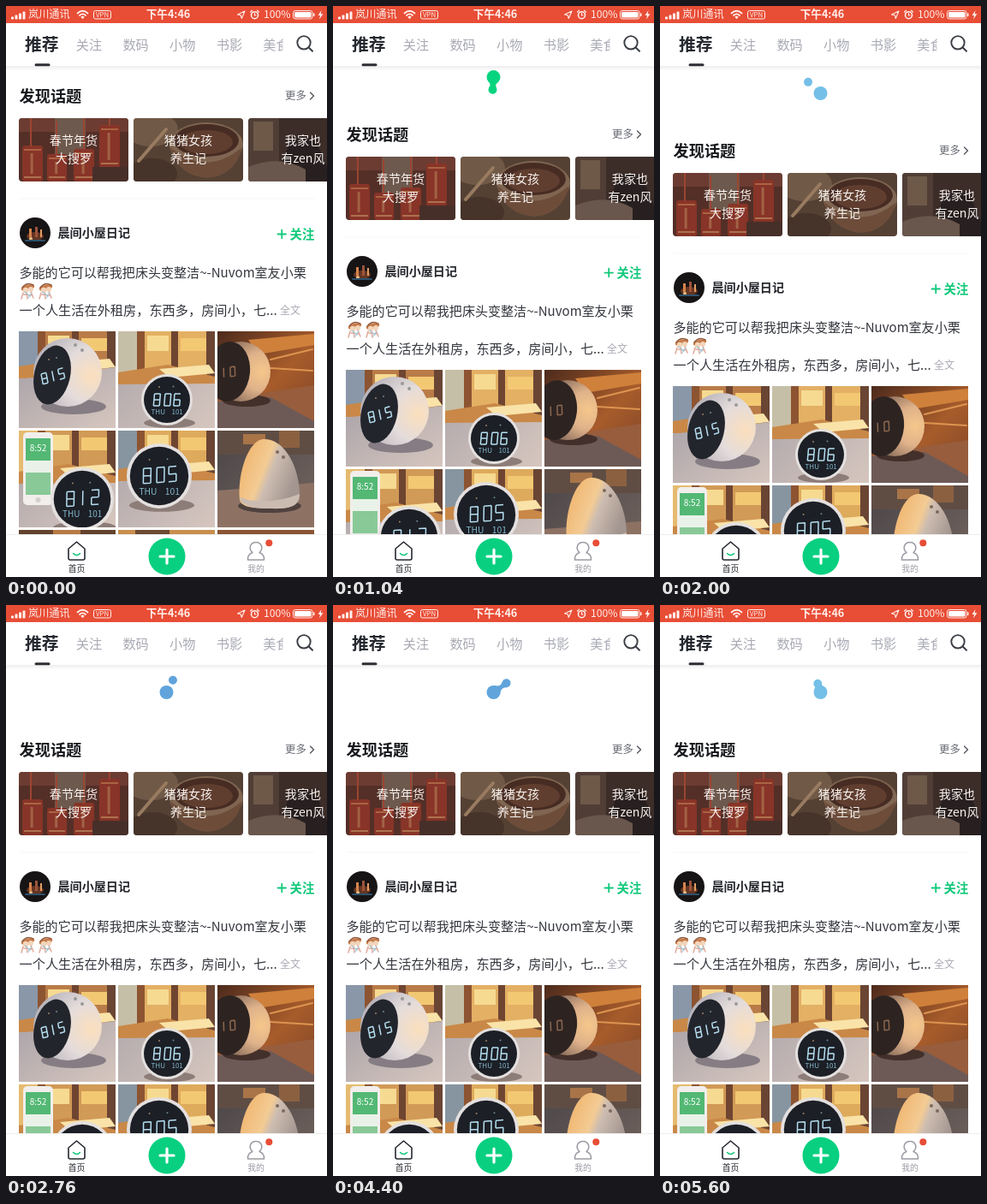
An HTML page for the animation above (5640 ms loop, 375 px wide and 667 px high).

```html
<!DOCTYPE html>
<html lang="zh-CN">
<head>
<meta charset="utf-8">
<title>Pull to refresh</title>
<style>
html,body{margin:0;width:100%;height:100%;overflow:hidden;background:#fff}
svg{display:block}
#stage{width:100vw;height:100vh}
text{font-family:"Noto Sans CJK SC","Noto Sans CJK",sans-serif}
</style>
</head>
<body>
<svg id="stage" viewBox="0 0 375 667">
<defs>
<linearGradient id="shade" x2="0" y2="1"><stop stop-color="#000" stop-opacity=".07"/><stop offset="1" stop-color="#000" stop-opacity="0"/></linearGradient>
<linearGradient id="table" x2="1" y2="1"><stop stop-color="#aaa3a9"/><stop offset="1" stop-color="#d6c6be"/></linearGradient>
<linearGradient id="wood" x2="1" y2="1"><stop stop-color="#4c2a1c"/><stop offset=".55" stop-color="#a85c2b"/><stop offset="1" stop-color="#7a4227"/></linearGradient>
<linearGradient id="dusk" x2="1" y2="1"><stop stop-color="#4a4548"/><stop offset="1" stop-color="#75665f"/></linearGradient>
<linearGradient id="dome" x2="1" y2=".45"><stop stop-color="#efae62"/><stop offset=".5" stop-color="#f3cb94"/><stop offset=".62" stop-color="#cdbdb1"/><stop offset="1" stop-color="#a3958f"/></linearGradient>
<radialGradient id="ball" cx=".85" cy=".55" r=".8"><stop stop-color="#fbdfbd"/><stop offset=".5" stop-color="#e4dcdb"/><stop offset="1" stop-color="#b9b5bd"/></radialGradient>
<radialGradient id="warm" cx=".85" cy=".5" r=".8"><stop stop-color="#f6c78b"/><stop offset=".4" stop-color="#dfb28a"/><stop offset="1" stop-color="#6d564c"/></radialGradient>
<clipPath id="card"><rect width="128" height="74" rx="4"/></clipPath>
<clipPath id="photo"><rect width="113" height="113"/></clipPath>
<clipPath id="tabs"><rect x="295" y="30" width="28.5" height="32"/></clipPath>
</defs>
<g id="list"></g>
<g id="blob"><circle r="8"/><g id="arm"><path id="neck"/><circle id="small" r="5"/></g></g>
<g id="chrome"></g>
</svg>
<script>
const $ = id => document.getElementById(id);
const DARK = '#25282f', GREY = '#a8a9b3', GREEN = '#08d080', RED = '#e84d36';

const rect = (x, y, w, h, fill, more = '') => `<rect x="${x}" y="${y}" width="${w}" height="${h}" fill="${fill}" ${more}/>`;
const disc = (x, y, r, fill, more = '') => `<circle cx="${x}" cy="${y}" r="${r}" fill="${fill}" ${more}/>`;
const oval = (x, y, rx, ry, fill, turn = 0) => `<ellipse cx="${x}" cy="${y}" rx="${rx}" ry="${ry}" fill="${fill}" transform="rotate(${turn} ${x} ${y})"/>`;
const shape = (d, fill) => `<path d="${d}" fill="${fill}"/>`;
const line = (d, color, w = 1) => `<path d="${d}" fill="none" stroke="${color}" stroke-width="${w}" stroke-linecap="round" stroke-linejoin="round"/>`;
const text = (s, x, y, size, fill, more = '') => `<text x="${x}" y="${y}" font-size="${size}" fill="${fill}" ${more}>${s}</text>`;
const group = (x, y, body, more = '') => `<g transform="translate(${x} ${y})"><g ${more}>${body}</g></g>`;
const MID = 'text-anchor="middle"', BOLD = 'font-weight="700"';

// Seven-segment digits
const SEG = { a: 'M0 0H1', b: 'M1 0V1', c: 'M1 1V2', d: 'M0 2H1', e: 'M0 1V2', f: 'M0 0V1', g: 'M0 1H1', i: 'M.4 0V2' };
const LIT = { 0: 'abcdef', 1: 'i', 2: 'abged', 5: 'afgcd', 6: 'afgcde', 8: 'abcdefg' };
function digits(s, x, y, w, turn = 0, color = '#b5dff0') {
  const glyphs = [...s].map((c, i) =>
    `<path transform="translate(${i * 1.6 + (i ? .2 : 0)} 0)" d="${[...LIT[c]].map(k => SEG[k]).join('')}"/>`).join('');
  return `<g transform="translate(${x} ${y}) rotate(${turn}) skewX(-5) scale(${w})" fill="none" stroke="${color}" stroke-width="${1.5 / w}">${glyphs}</g>`;
}

function clock(x, y, r, time, turn = 0) {
  const w = r * .23;
  return oval(x + 3, y + r * .9, r, r * .2, '#8d7d78') + disc(x, y, r, '#e4e0df') + disc(x, y, r * .9, '#1c1f26')
    + digits(time, x - w * 2.1, y - w, w, turn)
    + text('THU', x - r * .62, y + r * .58, r * .27, '#83b8cc') + text('101', x + r * .18, y + r * .58, r * .27, '#83b8cc')
    + disc(x - r * .3, y - r * .5, 1, '#9c8064') + disc(x + r * .25, y - r * .52, 1, '#6e8793');
}

const street = (y, wall, sky) => rect(0, 0, 113, 113, 'url(#table)') + rect(0, 0, 113, y, wall)
  + rect(0, 0, 22, y - 8, sky) + rect(22, 0, 9, y, '#8d5432') + rect(34, 5, 25, 18, '#f6da91')
  + rect(62, 0, 8, y - 12, '#6f4531') + rect(73, 8, 30, 15, '#f3c873') + rect(103, 0, 10, y, '#6a4533')
  + shape(`M0 ${y - 9}L58 ${y - 18}L113 ${y - 4}V${y + 4}L0 ${y + 5}Z`, '#c98847')
  + shape(`M48 ${y - 13}L106 ${y - 18}L113 ${y - 8}L60 ${y - 3}Z`, '#f9e3a8');

const photos = [
  street(50, '#b97c48', '#8997a8') + shape('M0 56L113 42V113H0Z', 'url(#table)')
    + oval(64, 88, 38, 9, '#857d83') + disc(57, 48, 40, 'url(#ball)')
    + oval(39, 51, 21, 35, '#23252c', 13) + digits('815', 26, 50, 6, -16)
    + disc(66, 16, 2, '#999') + disc(74, 22, 2, '#999') + disc(35, 33, 1, '#9c8064') + disc(44, 31, 1, '#6e8793'),
  street(57, '#e3b064', '#c6bfa7') + clock(57, 80, 30, '806'),
  rect(0, 0, 113, 113, 'url(#wood)') + shape('M36 10L113 3V16L48 27Z', '#cf803b') + shape('M0 80L113 63V113H0Z', '#985d3c')
    + shape('M0 82L62 77L113 105V113H0Z', '#6d5a56') + line('M62 33L111 21M62 43L111 46', '#dd9450', 2)
    + oval(34, 81, 28, 7, '#43302a') + disc(27, 47, 35, 'url(#warm)') + oval(13, 47, 25, 35, '#2d2422', 6)
    + digits('10', 5, 43, 5.5, -7, '#8d674e'),
  street(57, '#d19a56', '#e5bb70') + rect(5, 2, 35, 85, '#f1eeec', 'rx="5"') + rect(8, 9, 29, 66, '#53b874')
    + rect(8, 35, 29, 14, '#e9f2e9') + rect(8, 49, 29, 26, '#88c997') + text('8:52', 22.5, 24, 10, '#fff', MID)
    + disc(22.5, 81, 3, '#d4d0d0') + clock(74, 80, 37, '812', -4),
  street(54, '#deaa5c', '#8795a0') + clock(48, 53, 38, '805', -4),
  rect(0, 0, 113, 113, 'url(#dusk)') + rect(0, 0, 113, 28, '#5f4d44') + rect(30, 4, 26, 12, '#a87448') + rect(72, 0, 24, 20, '#8b6041')
    + shape('M0 70L113 61V113H0Z', '#8d7264') + oval(61, 88, 37, 8, '#4f423e')
    + shape('M26 81C23 55 34 13 53 10C77 8 96 41 96 76C95 89 83 91 62 91C40 91 28 89 26 81Z', 'url(#dome)')
    + shape('M26 78Q57 89 96 74C96 88 86 92 61 91Q27 91 26 78Z', '#cbbcb2') + disc(70, 25, 2, '#7d6a60') + disc(77, 31, 2, '#7d6a60'),
  rect(0, 0, 113, 113, '#64432e') + rect(40, 0, 32, 20, '#b77a45'),
  rect(0, 0, 113, 113, '#c98f4d') + rect(20, 0, 40, 20, '#6e4a33'),
  rect(0, 0, 113, 113, '#8b5534')
];

const lantern = (x, y, w, h) => rect(x, y, w, h, '#93382b', 'rx="3"') + rect(x + 2, y + 4, w - 4, 2, '#b96b48')
  + rect(x + 2, y + h - 6, w - 4, 2, '#bd7b55') + rect(x + w * .4, y + 9, 3, h - 18, '#b06a4b');
const scenes = [
  rect(0, 0, 128, 74, '#5a332a') + rect(0, 0, 128, 16, '#754136') + rect(42, 0, 36, 44, '#766153')
    + lantern(4, 32, 24, 42) + lantern(33, 42, 23, 32) + lantern(64, 36, 24, 38) + lantern(94, 8, 24, 50)
    + line('M14 0V32M106 0V8M76 0V36M44 4V42', '#a94a35', 2) + rect(86, 57, 42, 17, '#4d332d'),
  rect(0, 0, 128, 74, '#5b4638') + oval(20, 13, 32, 20, '#79604c') + oval(85, 31, 43, 26, '#8b6f59')
    + oval(85, 26, 38, 19, '#4d3026') + oval(85, 28, 31, 14, '#684333') + shape('M43 34Q85 69 127 34Q119 67 86 70Q51 67 43 34Z', '#76543f')
    + oval(22, 65, 29, 18, '#4c372d') + line('M6 50L38 13', '#a58568', 4),
  rect(0, 0, 128, 74, '#41312d') + rect(0, 0, 36, 74, '#57433b') + shape('M30 74L48 30Q65 10 82 33L99 74Z', '#2b2323')
    + shape('M0 57Q36 42 67 60V74H0Z', '#725d52') + rect(6, 4, 23, 34, '#77604f')
];
const captions = [['春节年货', '大搜罗'], ['猪猪女孩', '养生记'], ['我家也', '有zen风']];

const dancer = x => group(x, 323,
  oval(9.5, 6, 8, 3.4, '#c87a48', -14) + line('M3 6Q8 -1 16 3', '#8b563c', 1.4) + disc(7, 9, 3.2, '#f2d5bb') + disc(13, 8, 3, '#f2d5bb')
  + line('M4 12L2 19M8 12L9 19M13 11L16 18M5 14L15 15', '#e2a99a', 1.5) + line('M6 11L12 16M14 12L10 18', '#9fc9d8', 1.2));

$('list').innerHTML = [
  text('发现话题', 15.5, 111.5, 18.2, '#17191d', BOLD),
  text('更多', 326, 109.2, 12.4, '#666972'), line('M355.5 101L359.5 105L355.5 109', '#55585f', 1.4),
  scenes.map((s, i) => group(15 + 134 * i, 131,
    s + rect(0, 0, 128, 74, '#000', 'opacity=".08"')
    + captions[i].map((c, j) => text(c, 64, 31 + 21 * j, 14.1, '#f7f2ef', MID)).join(''), 'clip-path="url(#card)"')).join(''),
  rect(15, 224.5, 345, 1, '#f8f7f7'),
  disc(34, 265, 18, '#171415'), oval(34, 269, 10, 5, '#653623'), rect(27, 260, 3, 10, '#d6844c'), rect(34, 258, 3, 12, '#9c543b'),
  rect(40, 261, 2, 9, '#e39d61'), disc(29, 272, 2, '#ecbd82'), line('M23 274H45', '#2d516d', 2),
  text('晨间小屋日记', 60.5, 270, 14.1, '#24262c', BOLD),
  line('M317.5 266.5H327M322.25 261.7V271.3', '#10c97a', 1.8), text('关注', 331.5, 271.5, 14.4, '#10c97a', BOLD),
  text('多能的它可以帮我把床头变整洁~-Nuvom室友小栗', 15.5, 316.5, 15.05, '#33363d'),
  dancer(16), dancer(37),
  text('一个人生活在外租房，东西多，房间小，七...', 15.5, 360.5, 15.2, '#33363d'), text('全文', 320, 359.8, 12, GREY),
  photos.map((p, i) => group(15 + 116 * (i % 3), 380 + 116 * Math.floor(i / 3), p, 'clip-path="url(#photo)"')).join('')
].join('');

const PALE = '#fff0ec';
$('chrome').innerHTML = [
  rect(0, 70, 375, 6, 'url(#shade)'), rect(0, 20, 375, 50, '#fff'), rect(0, 0, 375, 20, RED),
  [0, 1, 2, 3].map(i => rect(6 + 4.5 * i, 12.5 - 2 * i, 3, 3 + 2 * i, PALE, 'rx=".6"')).join(''),
  text('岚川通讯', 26, 14.3, 12.2, PALE),
  line('M83.5 8.5Q89.5 3 95.5 8.5M86 11Q89.5 7.8 93 11', PALE, 1.8), shape('M87.3 12.7Q89.5 11 91.7 12.7L89.5 15.2Z', PALE),
  rect(102.5, 5.5, 20, 9.5, 'none', `rx="2" stroke="${PALE}"`), text('VPN', 112.5, 13.1, 7.8, PALE, MID),
  text('下午4:46', 189.5, 14.3, 12.6, PALE, MID + ' ' + BOLD),
  line('M270.5 10L279 6L275.3 14.5L274.3 10.8Z', PALE, 1.1),
  disc(290.5, 10.7, 4, 'none', `stroke="${PALE}" stroke-width="1.6"`), line('M290.5 8.5V11H292M285.5 7L287.5 5.2M295.5 7L293.5 5.2', PALE, 1.2),
  text('100%', 301, 14.4, 12.2, PALE),
  rect(335.5, 5.5, 22.5, 9.5, 'none', `rx="2.4" stroke="${PALE}"`), rect(337, 7, 19.5, 6.5, '#fff', 'rx="1.2"'), rect(359, 8.3, 1.5, 4, PALE, 'rx=".7"'),
  shape('M368.5 5L364.5 11H367L366 15.5L370.5 9.2H367.7Z', PALE),
  text('推荐', 22, 52.2, 19.8, DARK, BOLD),
  ['关注', '数码', '小物', '书影'].map((s, i) => text(s, 81.7 + 54.7 * i, 51, 15.2, GREY)).join(''),
  text('美食', 300.3, 51, 15.2, GREY, 'clip-path="url(#tabs)"'),
  rect(33.5, 67.3, 18, 3, '#2c2e34', 'rx="1.5"'),
  disc(348, 42.8, 7.7, 'none', 'stroke="#3a3d44" stroke-width="1.9"'), line('M353.7 48.5L358 52.7', '#3a3d44', 2),
  rect(0, 617.5, 375, 49.5, '#fff'), rect(0, 617, 375, 1, '#eeeeef'),
  line('M73 634L82.5 626L92 634V645Q92 647 90 647H75Q73 647 73 645Z', DARK, 1.6), line('M78.5 639.5Q82.5 643.5 86.5 639.5', '#10c97a', 1.6),
  text('首页', 82.5, 661, 9.8, DARK, MID),
  disc(188, 643, 21.5, GREEN), line('M180 643H196M188 635V651', '#fff', 3.2),
  line('M288 638.5C283 634 285 626.5 292 626.5S301 634 296 638.5C300 640 302 643 301.5 647H282.5C282 643 284 640 288 638.5Z', '#9a9ca3', 1.5),
  disc(307.3, 627.3, 4, RED), text('我的', 292, 661, 9.8, '#9a9ca3', MID)
].join('');

const LOOP = 5640, STEP = 40, REST = 64, REACH = 21;
const PULL_AT = 780, PULL_FOR = 780, SPIN_AT = 886, CYCLE = 2000;
// Three petals: start angle, swing, colour
const PETALS = [
  [98, -18, [8, 212, 127]],
  [256, -50, [116, 191, 232]],
  [338, -50, [97, 164, 220]]
];
const clamp = v => Math.max(0, Math.min(1, v));

function draw(t) {
  const pulled = 1 - Math.pow(1 - clamp((t - PULL_AT) / PULL_FOR), 3);
  const pull = REST * pulled;
  $('list').setAttribute('transform', `translate(0 ${pull.toFixed(2)})`);
  $('blob').setAttribute('transform', `translate(187.5 ${(pull + 38).toFixed(2)})`);

  const turns = Math.max(0, t - SPIN_AT) / CYCLE * 3;
  const k = Math.floor(turns), u = turns - k;
  const [from, swing, color] = PETALS[k % 3], next = PETALS[(k + 1) % 3][2];
  // The first drop is drawn out by the pull itself
  const thrown = k ? REACH * Math.pow(Math.sin(Math.PI * u), .45) : REACH * Math.pow(Math.sin(Math.PI * Math.max(u, .5)), .45);
  const dist = Math.min(thrown, REACH * pulled);
  const mix = clamp((u - .94) / .06);
  $('blob').setAttribute('fill', `rgb(${color.map((c, i) => Math.round(c + (next[i] - c) * mix))})`);
  $('arm').setAttribute('transform', `rotate(${from + swing * u})`);
  $('small').setAttribute('cx', dist);

  const joined = u < .43 || dist < 13;
  const x2 = dist - 2.5, w = 9 - dist / 2, m = (5 + x2) / 2;
  $('neck').setAttribute('d', joined && dist > 6 ? `M5 6.2Q${m} ${w} ${x2} 4.3V-4.3Q${m} ${-w} 5 -6.2Z` : '');
}

const begin = performance.now();
function tick() {
  const t = (performance.now() - begin) % LOOP;
  draw(Math.floor(t / STEP) * STEP);
  requestAnimationFrame(tick);
}
tick();
</script>
</body>
</html>
```
